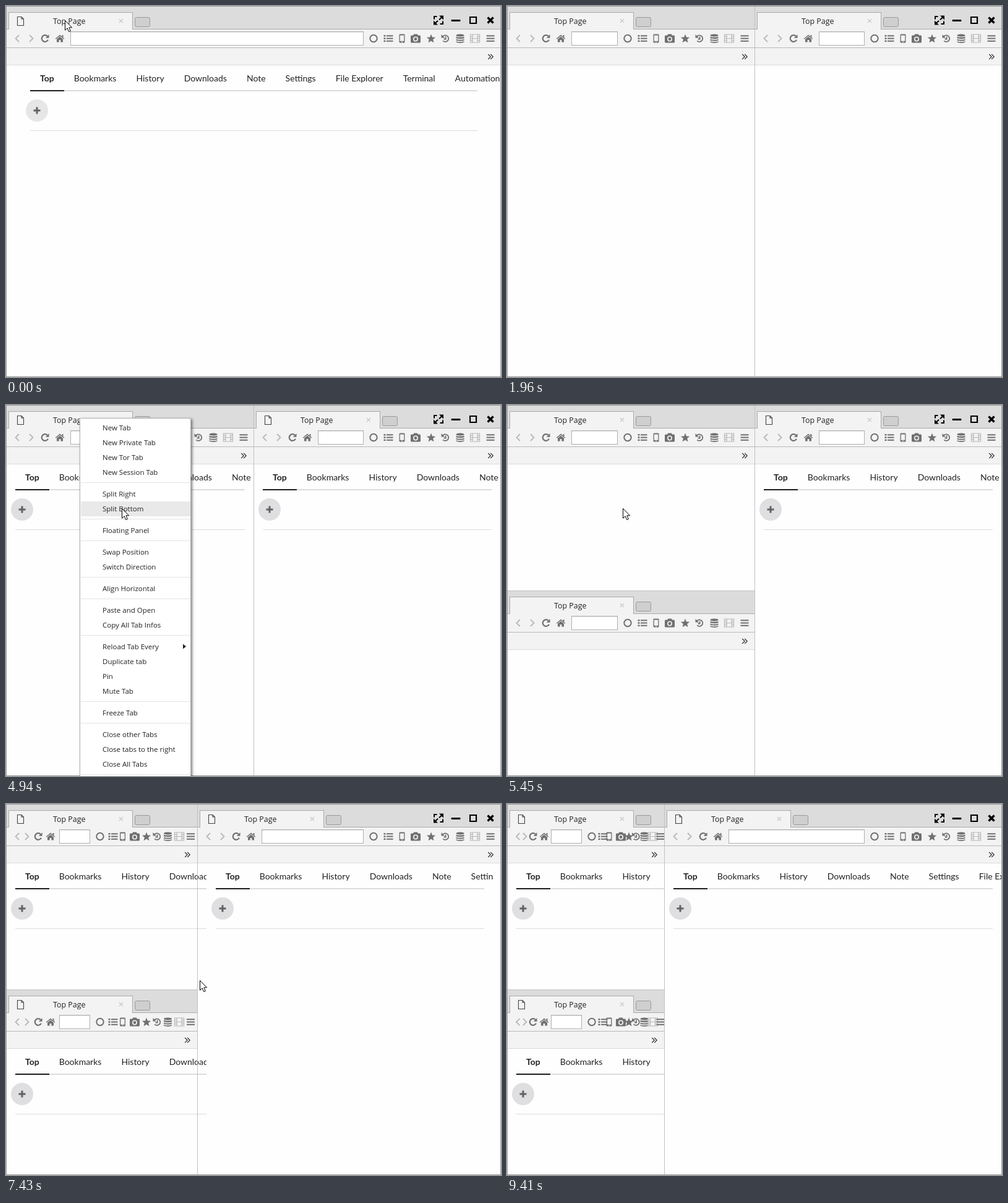
An HTML page with a canvas that plays this animation: 800 px wide and 600 px high, repeating every 9910 ms.

```html
<!DOCTYPE html>
<html lang="en">
<head>
<meta charset="utf-8">
<title>Split panes</title>
<style>
html, body { margin: 0; width: 100%; height: 100%; overflow: hidden; }
canvas { display: block; }
</style>
</head>
<body>
<canvas width="800" height="600"></canvas>
<script>
const ctx = document.querySelector('canvas').getContext('2d');
const LOOP = 9910;
const UI = '"Open Sans", sans-serif', PAGE = 'Lato, sans-serif';

// Each step overrides the state left by the previous ones.
const STEPS = [
  [0, { split: 0, stacked: false, plus: '#e6e6e6', cursor: ['arrow', 95, 23] }],
  [500, { ghost: [213, 38], plus: '#dfdfe1', cursor: ['drag', 304, 51] }],
  [970, { ghost: [569, 216], cursor: null }],
  [1460, { ghost: [646, 267], dropZone: true, cursor: ['drag', 737, 280] }],
  [1960, { ghost: null, dropZone: false, split: 400, loading: 2, cursor: null }],
  [2450, { loading: 0, caret: true, cursor: ['arrow', 745, 280] }],
  [2940, { cursor: ['arrow', 272, 68] }],
  [3450, { cursor: ['arrow', 119, 21] }],
  [3960, { caret: false, menu: true }],
  [4440, { hover: 'New Private Tab', cursor: ['arrow', 146, 52] }],
  [4940, { hover: 'Split Bottom', cursor: ['arrow', 187, 167] }],
  [5450, { menu: false, stacked: true, loading: 2 }],
  [5950, { loading: 0, caret: true }],
  [6440, { caret: false, cursor: ['arrow', 251, 229] }],
  [6920, { caret: true, cursor: ['resize', 404, 281] }],
  [7430, { caret: false, split: 309, lag: 15, cursor: ['arrow', 313, 285] }],
  [7920, { split: 254, lag: 0, cursor: ['resize', 258, 285] }],
  [8410, { cursor: ['arrow', 272, 291] }],
  [8910, { cursor: ['arrow', 712, 580] }],
  [9410, { cursor: null }]
];

const MENU = [
  ['New Tab', 'New Private Tab', 'New Tor Tab', 'New Session Tab'],
  ['Split Right', 'Split Bottom'],
  ['Floating Panel'],
  ['Swap Position', 'Switch Direction'],
  ['Align Horizontal'],
  ['Paste and Open', 'Copy All Tab Infos'],
  ['Reload Tab Every', 'Duplicate tab', 'Pin', 'Mute Tab'],
  ['Freeze Tab'],
  ['Close other Tabs', 'Close tabs to the right', 'Close All Tabs']
];
const SECTIONS = ['Top', 'Bookmarks', 'History', 'Downloads', 'Note', 'Settings',
  'File Explorer', 'Terminal', 'Automation'];

const starPath = 'M' + Array.from({ length: 10 }, (_, i) => {
  const r = i % 2 ? 3.3 : 7.6, a = i * Math.PI / 5;
  return (r * Math.sin(a)).toFixed(2) + ' ' + (0.6 - r * Math.cos(a)).toFixed(2);
}).join('L') + 'z';

// fill, stroke and stroke width, centred on the origin
const icon = (fill, stroke = '', width = 2) =>
  ({ fill: new Path2D(fill), stroke: new Path2D(stroke), width });
const ICONS = {
  back: icon('', 'M3-5.5L-2.5 0 3 5.5', 1.8),
  forward: icon('', 'M-3-5.5L2.5 0-3 5.5', 1.8),
  reload: icon('M6.5-6.5V-.8H.8z', 'M4.9 2.2A5.3 5.3 0 1 1 3.8-3.8', 2.2),
  home: icon('M0-6L7.3.2 6.4 1.2 0-4.1-6.4 1.2-7.3.2zM3.5-5.5H5.5V-1L3.5-2.8zM-5 1.2L0-3 5 1.2V6H1.4V2.4H-1.4V6H-5z'),
  ring: icon('', 'M5.7 0A5.7 5.7 0 1 1-5.7 0A5.7 5.7 0 1 1 5.7 0z'),
  list: icon('M-7.5-5.5h3v2.6h-3zm0 4.2h3v2.6h-3zm0 4.2h3v2.6h-3zM-3-5.2H7.5v2H-3zm0 4.2H7.5v2H-3zm0 4.2H7.5v2H-3z'),
  phone: icon('M-3.5-7h7l1 1V6l-1 1h-7l-1-1V-6zM-3.2-5V4.2H3.2V-5zM-.8 5v1.2H.8V5z'),
  camera: icon('M-7-5H-3.8L-2.8-7H2.8L3.8-5H7L8-4V6L7 7H-7L-8 6V-4zM4 1A4 4 0 1 0-4 1A4 4 0 1 0 4 1zM2.4 1A2.4 2.4 0 1 1-2.4 1A2.4 2.4 0 1 1 2.4 1z'),
  star: icon(starPath),
  history: icon('M-6.5-6.5V-1H-1z', 'M-4.2-3.2A5.3 5.3 0 1 1-3.8 3.9M.6-3V1H-2.4', 1.8),
  database: icon('M-6.5-5C-6.5-7.8 6.5-7.8 6.5-5C6.5-2.4-6.5-2.4-6.5-5zM-6.5-3C-4-1.4 4-1.4 6.5-3V-1C6.5 1.2-6.5 1.2-6.5-1zM-6.5 1C-4 2.6 4 2.6 6.5 1V2.5C6.5 4.7-6.5 4.7-6.5 2.5zM-6.5 4.6C-4 6.2 4 6.2 6.5 4.6V5.6C6.5 8-6.5 8-6.5 5.6z'),
  film: icon('', 'M-7.5-6.5H7.5V6.5H-7.5zM-4-6.5V6.5M4-6.5V6.5M-4 0H4M-7.5-3.2H-4M-7.5 0H-4M-7.5 3.2H-4M4-3.2H7.5M4 0H7.5M4 3.2H7.5', 1.2),
  bars: icon('M-6.5-5.2H6.5v2H-6.5zm0 4.2H6.5v2H-6.5zm0 4.2H6.5v2H-6.5z'),
  chevrons: icon('', 'M-3.8-4L.2 0-3.8 4M.2-4L4.2 0 .2 4', 1.2),
  page: icon('', 'M-5-7H1.5L5-3.5V7H-5zM1.5-7V-3.5H5', 1.1),
  close: icon('', 'M-3-3L3 3M3-3L-3 3', 1.2),
  plus: icon('M-1.5-5.5h3v4h4v3h-4v4h-3v-4h-4v-3h4z'),
  expand: icon('M1-7.5H8V-.5zM-8 .5V7.5H-1z', 'M5-4.5L1-.8M-5 4.5L-1 .8M-7-1.5V-6H-2.5M7 1.5V6H2.5', 2),
  minimize: icon('M-7-1Q-8 1-7 2H7Q8 1 7-1z'),
  maximize: icon('', 'M-5-5H5V5H-5z', 2.2),
  quit: icon('', 'M-4.5-4.5L4.5 4.5M4.5-4.5L-4.5 4.5', 3.4)
};
const NAV = ['back', 'forward', 'reload', 'home', 'ring', 'list', 'phone', 'camera',
  'star', 'history', 'database', 'film', 'bars'];
const ARROW = new Path2D('M.5.5V16.2L4.2 12.8 6.7 18.6 9.3 17.5 6.9 11.8H11.6z');

function draw(name, x, y, color = '#707070') {
  const { fill, stroke, width } = ICONS[name];
  ctx.save();
  ctx.translate(x, y);
  ctx.fillStyle = ctx.strokeStyle = color;
  ctx.lineWidth = width;
  ctx.fill(fill, 'evenodd');
  ctx.stroke(stroke);
  ctx.restore();
}
function rect(x, y, w, h, color) {
  ctx.fillStyle = color;
  ctx.fillRect(x, y, w, h);
}
function box(x, y, w, h, fill, border) {
  rect(x, y, w, h, border);
  rect(x + 1, y + 1, w - 2, h - 2, fill);
}
function text(str, x, y, font, color = '#222') {
  ctx.font = font;
  ctx.fillStyle = color;
  ctx.fillText(str, x, y);
}
function clipped(x, y, w, h, paint) {
  ctx.save();
  ctx.beginPath();
  ctx.rect(x, y, w, h);
  ctx.clip();
  paint();
  ctx.restore();
}

// Toolbar positions relative to the pane; the icons crowd together when it is narrow.
function navSlots(width) {
  if (width < 300) return { field: [71, 121],
    at: [17.5, 29, 42, 60, 137, 155, 165, 184, 197, 208.5, 222, 235.5, 248] };
  if (width < 390) return { field: [86, 136],
    at: [18, 34, 52, 72, 152, 173, 188.5, 208, 227, 244, 261.5, 280, 298.5] };
  const fromRight = [206, 182, 160, 138, 113, 90, 66, 42, 17];
  return { field: [104, width - 222], at: [18, 41, 63, 87, ...fromRight.map(d => width - d)] };
}

function drawTab(x, y, loading) {
  if (!loading) draw('page', x + 19.5, y + 14.5, '#444');
  text('Top Page', x + 72, y + 19, '12.4px ' + UI);
  draw('close', x + 182, y + 14, '#c8c8c8');
}

function drawChrome({ x, y, right, loading }, s) {
  const width = right - x;
  clipped(x, y, width, 96, () => {
    rect(x, y, width, 37, '#dcdcdc');
    rect(x, y + 37, width, 1, '#aaa');
    rect(x, y + 38, width, 58, '#f3f3f3');
    rect(x, y + 67, width, 1, '#b8b8b8');
    rect(x, y + 95, width, 1, '#dcdcdc');

    ctx.globalAlpha = s.ghost ? 0.4 : 1;
    rect(x + 4, y + 10, 201, 28, '#aaa');
    rect(x + 5, y + 11, 199, 27, '#f3f3f3');
    drawTab(x + 4, y + 10, loading);
    ctx.globalAlpha = 1;

    ctx.beginPath();
    ctx.roundRect(x + 208.5, y + 18.5, 24, 15, 2);
    ctx.fillStyle = '#cfcfcf';
    ctx.strokeStyle = '#999';
    ctx.lineWidth = 1;
    ctx.fill();
    ctx.stroke();

    const { field: [from, to], at } = navSlots(width);
    box(x + from, y + 41, to - from, 23, '#fff', '#b0b0b0');
    rect(x + from + 1, y + 42, to - from - 2, 1, '#e4e4e4');
    NAV.forEach((name, i) => {
      const dim = i < 2 || name === 'film';
      draw(name, x + at[i], y + 52.5, dim ? '#b8b8b8' : '#707070');
    });
    draw('chevrons', right - 17, y + 82, '#333');
  });
}

function drawPage({ y, bottom, view: [from, to], content: [left, end], loading }, s) {
  rect(from, y + 96, to - from, bottom - y - 96, '#fefefe');
  if (loading) return;
  clipped(from, y + 96, to - from, bottom - y - 96, () => {
    rect(left, y + 136, end - left, 2, '#dcdcdc');
    rect(left, y + 201, end - left, 1, '#dcdcdc');
    let x = left;
    SECTIONS.forEach((name, i) => {
      text(name, x + 16, y + 122, (i ? '' : 'bold ') + '14px ' + PAGE);
      const width = ctx.measureText(name).width + 32;
      if (!i) rect(x, y + 136, Math.round(width), 2, '#1b1c1d');
      x += width;
    });
    ctx.beginPath();
    ctx.arc(left + 11, y + 169, 18, 0, 7);
    ctx.fillStyle = s.plus;
    ctx.fill();
    draw('plus', left + 11, y + 169, '#626262');
  });
}

function panes(s) {
  if (!s.split) return [{ x: 0, y: 0, right: 800, bottom: 600, view: [1, 799], content: [39, 762] }];
  const edge = s.split + s.lag;
  const pageEnd = s.lag ? 787 : 799;
  const leftEnd = s.split < 400 ? edge + 14 : edge - 14;
  const left = (y, bottom) =>
    ({ x: 0, y, right: s.split + 1, bottom, view: [1, edge], content: [15, leftEnd] });
  const right = { x: s.split, y: 0, right: 800, bottom: 600,
    view: [edge + 1, pageEnd], content: [edge + 15, pageEnd - 14] };
  const list = s.stacked ? [left(0, 300), left(300, 600), right] : [left(0, 600), right];
  list.forEach((pane, i) => pane.loading = i < s.loading);
  return list;
}

function drawGhost([x, y]) {
  ctx.globalAlpha = 0.7;
  box(x, y, 201, 29, '#f3f3f3', '#aaa');
  drawTab(x, y);
  ctx.globalAlpha = 1;
}

function drawMenu(hover) {
  ctx.save();
  ctx.shadowColor = 'rgba(0,0,0,.5)';
  ctx.shadowBlur = 4;
  ctx.shadowOffsetX = ctx.shadowOffsetY = 2;
  rect(119, 21, 180, 600, '#b4b4b4');
  ctx.restore();
  rect(120, 22, 178, 600, '#fff');
  let y = 37;
  for (const group of MENU) {
    for (const label of group) {
      if (label === hover) rect(121, y - 12, 177, 24, '#e9e9e9');
      text(label, 156, y + 4, '11.5px ' + UI);
      if (label === 'Reload Tab Every') {
        ctx.fill(new Path2D('M286 386.5L291 390.5 286 394.5z'));
      }
      y += 24;
    }
    rect(121, y - 8, 177, 1, '#e4e4e4');
    y += 11;
  }
}

function drawCursor([kind, x, y]) {
  ctx.save();
  ctx.translate(x, y);
  ctx.lineWidth = 1;
  ctx.strokeStyle = '#000';
  if (kind === 'resize') {
    rect(-3, -9, 6, 18, '#fff');
    rect(-2, -8, 1, 17, '#000');
    rect(1, -8, 2, 17, '#000');
    ctx.fill(new Path2D('M-10 .5L-6-3.5V0H-4V1H-6V4.5zM11 .5L7-3.5V0H5V1H7V4.5z'));
  } else {
    ctx.fillStyle = '#fff';
    ctx.fill(ARROW);
    ctx.stroke(ARROW);
    if (kind === 'drag') {
      rect(2, 16, 12, 9, '#fff');
      ctx.setLineDash([1, 1]);
      ctx.lineWidth = 2;
      ctx.strokeRect(3, 17, 10, 7);
    }
  }
  ctx.restore();
}

function render(time) {
  const s = { loading: 0, lag: 0 };
  for (const [start, change] of STEPS) if (time >= start) Object.assign(s, change);

  rect(0, 0, 800, 600, '#fefefe');
  const list = panes(s);
  list.forEach(pane => drawChrome(pane, s));
  list.forEach(pane => drawPage(pane, s));
  if (s.split) rect(s.split, 0, 1, 600, '#c0c0c0');
  if (s.stacked) rect(0, 300, s.split, 1, '#c0c0c0');

  draw('expand', 699, 23, '#000');
  draw('minimize', 727, 23, '#000');
  draw('maximize', 755, 23, '#000');
  draw('quit', 783, 23, '#000');

  if (s.caret) rect(110, 45, 1, 16, '#000');
  if (s.dropZone) rect(699, 96, 101, 504, 'rgba(0,0,0,.055)');
  if (s.ghost) drawGhost(s.ghost);
  ctx.strokeStyle = '#999';
  ctx.lineWidth = 1;
  ctx.strokeRect(0.5, 0.5, 799, 599);
  if (s.menu) drawMenu(s.hover);
  if (s.cursor) drawCursor(s.cursor);
}

const begin = performance.now();
function tick() {
  render((performance.now() - begin) % LOOP);
  requestAnimationFrame(tick);
}
tick();
</script>
</body>
</html>
```
